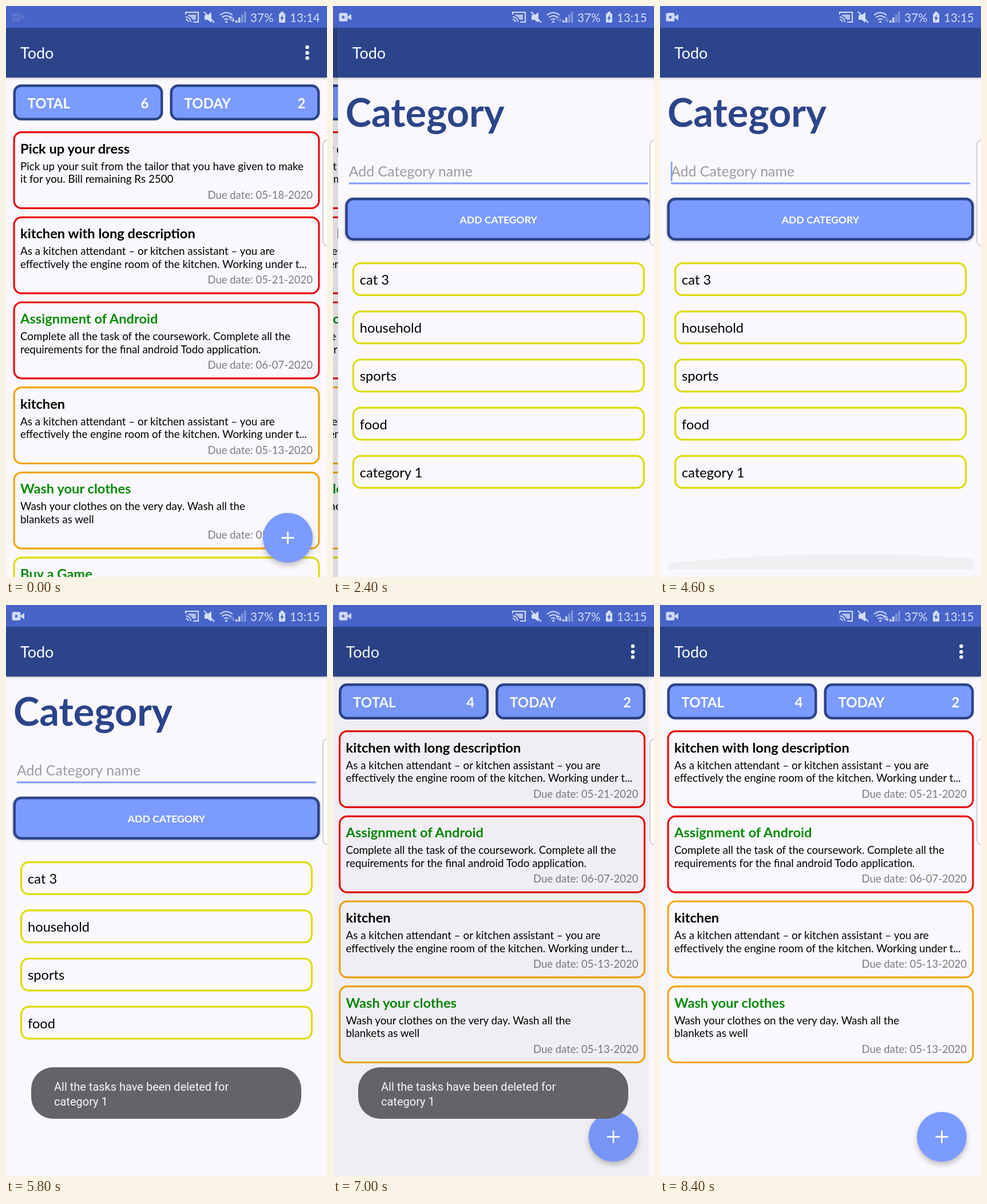
Animation of 561x998 px, one loop 8.5 s. Source, as an HTML page:

```html
<!DOCTYPE html>
<html lang="en">
<head>
<meta charset="utf-8">
<title>Todo</title>
<style>
  html, body { margin: 0; width: 100%; height: 100%; overflow: hidden; background: #faf8fd; }
  svg { display: block; width: 100vw; height: 100vh; }
  text { font-family: Lato, "Open Sans", sans-serif; white-space: pre; }
  .plain { font-family: Roboto, "Noto Sans", sans-serif; }
  .bold { font-weight: 700; }
  .line { fill: none; stroke: #333; stroke-width: 2.2; stroke-linecap: round; stroke-linejoin: round; }
  .raised { filter: drop-shadow(0 1.5px 2px rgba(0, 0, 0, .3)); }
  .floating { filter: drop-shadow(0 5px 5px rgba(0, 0, 0, .24)); }
</style>
</head>
<body>
<svg id="stage" viewBox="0 0 561 998" preserveAspectRatio="none"></svg>
<script>
const LOOP = 8500, STEP = 100;
const PAPER = '#faf8fd', NAVY = '#2c448a', SKY = '#7b9bff', PALE = '#d5def7', BAR = '#4864c8';
const RED = '#ea0a0a', ORANGE = '#f2a60c', YELLOW = '#dcdc05', GREEN = '#078a07';

const text = (x, y, s, size, fill = '#000', cls = '', anchor = 'start') =>
  `<text x="${x}" y="${y}" font-size="${size}" fill="${fill}" class="${cls}" text-anchor="${anchor}">${s}</text>`;
const rect = (x, y, w, h, fill, r = 0, extra = '') =>
  `<rect x="${x}" y="${y}" width="${w}" height="${h}" rx="${r}" fill="${fill}" ${extra}/>`;
const framed = (x, y, w, h, fill, border, bw, r) =>
  rect(x + bw / 2, y + bw / 2, w - bw, h - bw, fill, r, `stroke="${border}" stroke-width="${bw}"`);
const path = (d, extra = 'class="line"') => `<path d="${d}" ${extra}/>`;
const group = (id, body, extra = '') => `<g id="${id}" ${extra}>${body}</g>`;

const header = () => rect(0, 30, 561, 95, NAVY, 0, 'class="raised"') + text(25, 92, 'Todo', 27, '#fff');

const chip = (x, label, count) => framed(x, 137, 262, 63, SKY, NAVY, 4.5, 12) +
  text(x + 25, 179, label, 24, '#fff', 'bold') + text(x + 237, 179, count, 24, '#fff', 'bold', 'end');

const kitchenBody = ['As a kitchen attendant – or kitchen assistant – you are',
  'effectively the engine room of the kitchen. Working under t...'];
const tasks = [
  ['Pick up your dress', ['Pick up your suit from the tailor that you have given to make',
    'it for you. Bill remaining Rs 2500'], '05-18-2020', RED, '#000'],
  ['kitchen with long description', kitchenBody, '05-21-2020', RED, '#000'],
  ['Assignment of Android', ['Complete all the task of the coursework. Complete all the',
    'requirements for the final android Todo application.'], '06-07-2020', RED, GREEN],
  ['kitchen', kitchenBody, '05-13-2020', ORANGE, '#000'],
  ['Wash your clothes', ['Wash your clothes on the very day. Wash all the',
    'blankets as well'], '05-13-2020', ORANGE, GREEN],
  ['Buy a Game', ['', ''], '', YELLOW, GREEN],
];
const card = ([title, body, due, border, ink], i) => {
  const y = 219 + i * 148.7;
  return framed(12.5, y, 536, 136, PAPER, border, 3.2, 13) +
    text(25, y + 38.5, title, 23.7, ink, 'bold') +
    body.map((s, n) => text(25, y + 67.5 + n * 22.7, s, 18.8, '#000')).join('') +
    text(536, y + 117.5, 'Due date: ' + due, 18.5, '#7c7b7e', '', 'end');
};

const mainScreen = () => rect(0, 0, 561, 998, PAPER) + header() +
  [72, 82, 91].map(y => `<circle cx="526.5" cy="${y}" r="3.3" fill="#fff"/>`).join('') +
  group('before', chip(12.5, 'TOTAL', 6) + tasks.map(card).join('')) +
  group('after', chip(12.5, 'TOTAL', 4) + tasks.slice(1, 5).map(card).join('')) +
  chip(286.5, 'TODAY', 2) +
  `<circle cx="492.5" cy="929.5" r="43.5" fill="${SKY}" class="floating"/>` +
  path('M481.5 929.5h22M492.5 918.5v22', 'stroke="#fff" stroke-width="2.8"') +
  rect(0, 0, 561, 998, '#000', 0, 'id="dim"');

const menu = () => rect(267.5, 43, 288, 212, PAPER, 2, 'class="floating"') +
  rect(267.5, 43, 288, 67, '#e2e0e5', 0, 'id="press"') +
  ['Add Category', 'Delete All', 'Delete Completed']
    .map((s, i) => text(284, 83 + i * 74.6, s, 21.5, '#1c1c1e')).join('');

const categories = ['cat 3', 'household', 'sports', 'food', 'category 1'];
const categoryRow = (name, i) => {
  const y = 448 + i * 84.2;
  return group('row' + i, framed(25, y, 511, 59, PAPER, YELLOW, 3.2, 13) + text(38, y + 39, name, 23.7));
};
const categoryScreen = () => rect(0, 0, 561, 998, PAPER) + header() +
  text(13, 211, 'Category', 68.5, NAVY, 'bold') +
  text(19, 298, 'Add Category name', 24.9, '#9d9b9f') +
  rect(19, 308.5, 523, 3, SKY) + rect(19, 272, 2.5, 34, SKY, 0, 'id="cursor"') +
  group('button', framed(12.5, 335, 536, 75, SKY, NAVY, 4.5, 12), 'class="raised"') +
  text(280.5, 380, 'ADD CATEGORY', 17.6, '#fff', 'bold', 'middle') +
  group('list', categories.map(categoryRow).join('') +
    path('M12.5 985.5V974Q300 946 548.5 966V985.5Z', 'id="glow" fill="#f1eff2"'), 'clip-path="url(#listClip)"');

const key = (x, y, w, h, label, size = 28, fill = '#faf9fc', ink = '#1d1d1f', cls = '') =>
  rect(x, y + 1, w, h, '#c3c5c7', 7) + rect(x, y, w, h, fill, 7) +
  text(x + w / 2, y + h / 2 + size * .33, label, size, ink, cls, 'middle');
const keyRow = (chars, x, y, h, size) =>
  [...chars].map((c, i) => key(x + i * 54.5, y, 43.5, h, c, size)).join('');

const gearPoints = () => Array.from({ length: 48 }, (_, i) => {
  const a = i * Math.PI / 24, r = 13.3 + 2 * Math.cos(6 * a);
  return (469.5 + r * Math.cos(a)).toFixed(1) + ' ' + (576 + r * Math.sin(a)).toFixed(1);
}).join('L');
const toolbar = () =>
  path('M24 586a15 15 0 0 1-2-19l4-4M21 562h6v6M43 565a15 15 0 0 1 3 20l-4 5M48 590h-6v-6') +
  path('M28.5 571v-2h12v2M34.5 569v14M32 583h5') +
  path('M69.5 556v40', 'stroke="#c3c5c7"') +
  path('M129.5 576a15 15 0 1 1-30 0a15 15 0 1 1 30 0M107 579q7.5 9 15 0M109 571v.5M120 571v.5') +
  path('M193 563h20q3 0 3 3v13l-11 10h-12q-3 0-3-3v-20q0-3 3-3M216 579h-8q-3 0-3 3v7M197 572v.5M209 572v.5M196 578q4 5 8 3') +
  path('M305 577v-11q0-4-4-4h-19q-4 0-4 4v20q0 4 4 4h12M298 581v9l8-4.5z') +
  text(291.5, 579, 'GIF', 10, '#333', 'plain bold', 'middle') +
  rect(375.5, 560, 10, 20, '#222', 5) + path('M370 575a10.5 10.5 0 0 0 21 0M380.5 586v5') +
  path(`M${gearPoints()}Z`) + path('M474.5 576a5 5 0 1 1-10 0a5 5 0 1 1 10 0') +
  path('M522 572l9 9l9-9', 'fill="none" stroke="#8b8d8f" stroke-width="2"');
const keyboard = () => {
  const soft = '#e9e8ec';
  return rect(0, 544, 561, 460, '#d9dbdc') + rect(0, 544, 561, 64, '#dcdee0') +
    rect(0, 608, 561, 1, '#b5b7b8') + rect(0, 544, 561, 1, '#cdcfd1') + toolbar() +
    keyRow('1234567890', 13, 620, 49, 26) + keyRow('qwertyuiop', 13, 682, 63) +
    keyRow('asdfghjkl', 40.3, 758.5, 63) + keyRow('zxcvbnm', 95, 835, 63) +
    key(13, 835, 63, 63, '', 20, soft) + path('M44.5 854l-12 13h6v12h12v-12h6z', 'class="line" style="stroke:#666"') +
    key(485, 835, 63, 63, '', 20, soft) +
    path('M500 867l9-10h23v20h-23zM515 862l10 10M525 862l-10 10', 'class="line" style="stroke:#555"') +
    key(13, 911, 71, 63, '!#1', 26, soft, '#555', 'plain') + key(95, 911, 43.5, 63, ':') +
    key(149.5, 911, 262, 63, 'English (UK)', 18, '#faf9fc', '#555') +
    key(422, 911, 43.5, 63, '.', 38) + key(477, 911, 71, 63, '', 20, soft) +
    path('M505 935l-9 8l9 8v-5h24v-15h-6v9h-18z', 'class="line" style="stroke:#555;stroke-width:1.8"');
};

const toast = () => rect(44, 808, 472, 90, '#656367', 38) +
  text(84, 848.5, 'All the tasks have been deleted for', 20, '#f7f6f8', 'plain') +
  text(84, 874.5, 'category 1', 20, '#f7f6f8', 'plain');

const statusBar = () => {
  const line = `fill="none" stroke="${PALE}" stroke-width="2"`, solid = `fill="${PALE}"`;
  return rect(0, 0, 561, 38, BAR) +
    group('camera', rect(10.5, 12, 15, 15, PALE, 3) + path('M24 19.5l8-5.5v11z', solid) +
      `<circle cx="18" cy="19.5" r="2.3" fill="${BAR}"/>`) +
    path('M314 15v-4h22v17h-9M314 19a9 9 0 0 1 9 9M314 23.5a4.5 4.5 0 0 1 4.5 4.5', line) +
    path('M318 15h14v9h-6q-2-5-8-7z', `${solid} opacity=".75"`) +
    path('M347 16h5l7-5v18l-7-5h-5z', solid) + path('M346 10l18 19', line) +
    path('M374 16q11-9 22 0M377.5 20q7.5-6 15 0M381 24q4-3 8 0', line) +
    path('M385 25l-2.5 4h5z', solid) +
    group('arrows', path('M393 26v-7M390.5 21.5l2.5-3l2.5 3M397 20v6M395 24l2 3l2-3', `fill="none" stroke="${PALE}" stroke-width="1.4"`)) +
    [0, 1, 2, 3].map(i => rect(401 + i * 5, 25 - i * 5, 3.6, 4 + i * 5, PALE, 0, `opacity="${i > 1 ? .4 : .9}"`)).join('') +
    text(427, 27.5, '37%', 20.6, PALE) +
    rect(477, 13, 11, 16, PALE, 1.5) + rect(480, 10, 5, 4, PALE) +
    path('M484 15l-5 7h3l-1 5l5-7h-3z', `fill="${BAR}"`) +
    `<text id="clock" x="496" y="27.5" font-size="20.5" fill="${PALE}"></text>`;
};

document.getElementById('stage').innerHTML =
  '<clipPath id="listClip"><rect id="listBox" x="12.5" y="435" width="536" height="550"/></clipPath>' +
  group('main', mainScreen()) + group('menu', menu()) + group('category', categoryScreen()) +
  group('keyboard', keyboard()) + group('toast', toast()) + statusBar() +
  rect(554, 234, 20, 185, '#fff', 8, 'stroke="#b5b4b8" stroke-width="1.2"');

const $ = id => document.getElementById(id);
const clamp = v => Math.max(0, Math.min(1, v));
const ramp = (t, from, to) => clamp((t - from) / (to - from));
const easeOut = u => 1 - (1 - u) ** 3;
const within = (t, ...spans) => spans.some(([a, b]) => t >= a && t < b);
const fade = (id, v) => {
  $(id).style.opacity = v;
  $(id).style.display = v > 0 ? '' : 'none';
};
const move = (id, x, y = 0) => $(id).setAttribute('transform', `translate(${x.toFixed(2)} ${y.toFixed(2)})`);

function render(t) {
  // cover: how far the category screen hides the main one
  const opening = ramp(t, 2100, 2500), closing = ramp(t, 6700, 7100);
  const cover = t < 6700 ? easeOut(opening) : 1 - easeOut(closing);
  move('category', 561 * (1 - cover));
  move('main', -157 * cover);
  fade('category', cover > 0 ? 1 : 0);
  fade('dim', .16 * (t < 6700 ? opening : 1 - closing));
  fade('before', t < 5800 ? 1 : 0);
  fade('after', t < 5800 ? 0 : 1);

  fade('menu', t < 2200 ? ramp(t, 1100, 1300) : 0);
  fade('press', within(t, [2000, 2200]) ? 1 : 0);

  const shown = easeOut(ramp(t, 2400, 2700)) * (1 - ramp(t, 3300, 3600) ** 2);
  const drop = 454 * (1 - shown);
  move('keyboard', 0, drop);
  fade('keyboard', shown > 0 ? 1 : 0);
  $('listBox').setAttribute('height', 96.5 + drop);

  fade('cursor', within(t, [2700, 3400], [3900, 4400], [4600, 5000], [5400, 5700], [5900, 6400]) ? 1 : 0);
  fade('glow', ramp(t, 4100, 4600) * (1 - ramp(t, 5000, 5400)));
  move('row4', -561 * ramp(t, 5000, 5500) ** 1.5);
  fade('row4', t < 5500 ? 1 : 0);
  fade('toast', ramp(t, 5500, 5800) * (1 - ramp(t, 7600, 7900)));

  fade('camera', .12 + .83 * ramp(t, 0, 200));
  fade('arrows', within(t, [2000, 6900]) ? .4 : 1);
  $('clock').textContent = t < 1000 ? '13:14' : '13:15';
}

function tick() {
  const t = performance.now() % LOOP;
  render(Math.floor(t / STEP) * STEP);
  requestAnimationFrame(tick);
}
tick();
</script>
</body>
</html>
```
